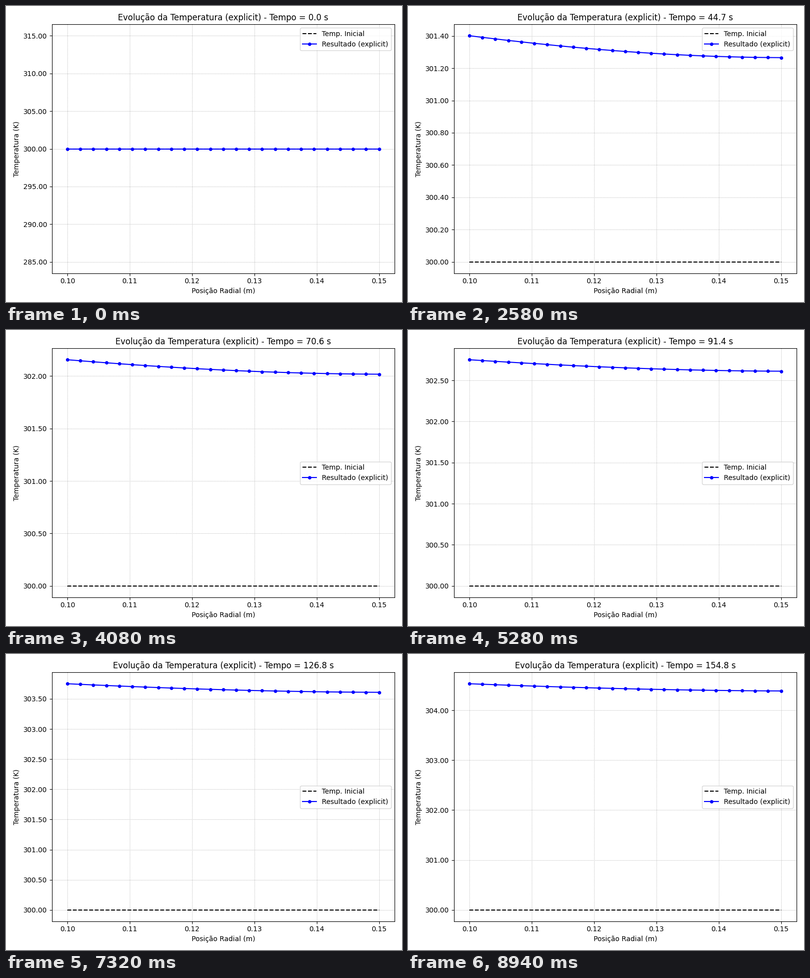
A matplotlib script that plays this animation: 800x600 px, repeating every 9 s.

```python
import numpy as np
import matplotlib.pyplot as plt
from matplotlib.animation import FuncAnimation
from matplotlib.ticker import FormatStrFormatter

FRAMES, INTERVAL = 150, 60
STEP = 1.03895            # simulated seconds per frame
SUBSTEPS = 160
T0 = 300.0                # initial and ambient temperature (K)
FLUX, COND, CONV = 1000.0, 205.0, 25.0
ALPHA = 2.478e-4

r = np.linspace(0.10, 0.15, 25)
dr = r[1] - r[0]


def simulate():
    """Explicit scheme: heat flux at the inner wall, convection at the outer."""
    dt = STEP / SUBSTEPS
    rise = np.zeros(r.size)
    ext = np.zeros(r.size + 2)
    history = [rise.copy()]
    for _ in range(FRAMES - 1):
        for _ in range(SUBSTEPS):
            ext[1:-1] = rise
            ext[0] = rise[1] + 2 * dr * FLUX / COND
            ext[-1] = rise[-2] - 2 * dr * CONV / COND * rise[-1]
            second = (ext[2:] - 2 * rise + ext[:-2]) / dr**2
            first = (ext[2:] - ext[:-2]) / (2 * dr)
            rise = rise + ALPHA * dt * (second - first / r)
        history.append(rise.copy())
    return T0 + np.array(history)


temps = simulate()

fig, ax = plt.subplots(figsize=(8, 6), dpi=100)
ax.plot(r, np.full(r.size, T0), "k--", label="Temp. Inicial")
curve, = ax.plot(r, temps[0], "bo-", markersize=4, label="Resultado (explicit)")
ax.set_xlabel("Posição Radial (m)")
ax.set_ylabel("Temperatura (K)")
title = ax.set_title("Evolução da Temperatura (explicit) - Tempo = 0.0 s")
ax.yaxis.set_major_formatter(FormatStrFormatter("%.2f"))
ax.grid(True, linestyle=":")
ax.legend(loc="best")
fig.tight_layout()


def update(i):
    curve.set_ydata(temps[i])
    ax.relim()
    ax.autoscale_view()
    title.set_text(f"Evolução da Temperatura (explicit) - Tempo = {i * STEP:.1f} s")
    return curve, title


anim = FuncAnimation(fig, update, frames=FRAMES, interval=INTERVAL,
                     repeat=True, repeat_delay=0, blit=False)
plt.show()
```
